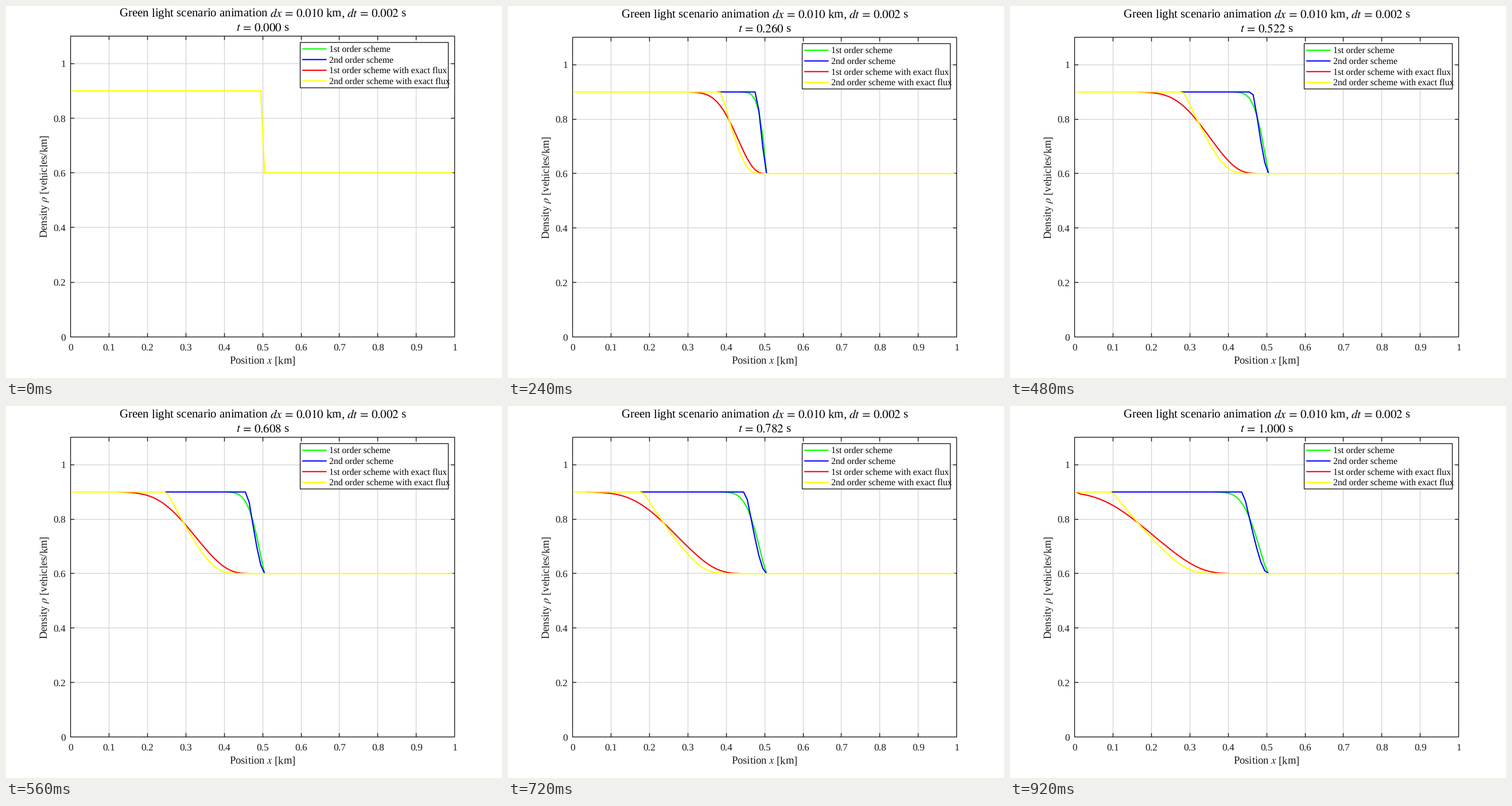
Animation of 864 by 648 pixels, one loop 960 ms. Source, as a matplotlib script:

```python
import math

import numpy as np
import matplotlib.pyplot as plt
from matplotlib.animation import FuncAnimation
from matplotlib.patches import Rectangle

W, H, DPI = 864, 648, 100
FRAMES, INTERVAL = 24, 40
DX, DT, STEPS = 0.01, 0.002, 500
LEFT, RIGHT, BOTTOM, TOP = 112.4, 781.8, 576.5, 52.5
Y_MAX = 1.1
INK, GRID = "#1a1a1a", "#d4d4d4"

plt.rcParams.update({
    "font.family": "Liberation Serif",
    "mathtext.fontset": "stix",
    "text.hinting": "none",
})


def px(n):
    """Pixels to points."""
    return n * 72 / DPI


# --- traffic model: all waves travel to the left ---
def log_flux(rho):
    return -rho * np.log10(rho)


def slow_flux(rho):
    excess = rho - 0.6
    return -(0.016 * excess + 0.0625 * excess ** 2)


def limited(ahead, behind):
    """Upwind slope, capped at twice the slope ahead of the wave."""
    size = np.minimum(2 * abs(ahead), abs(behind))
    return np.where(ahead * behind > 0, np.sign(behind) * size, 0)


def rate(rho, flux, order):
    face = rho.copy()
    if order == 2:
        d = np.diff(rho)
        face[1:-1] -= 0.5 * limited(d[:-1], d[1:])
    f = flux(face)
    out = np.zeros_like(rho)
    out[1:-1] = (f[1:-1] - f[2:]) / DX
    return out


def solve(flux, order):
    rho = np.where(x < 0.5, 0.9, 0.6)
    history = [rho]
    for _ in range(STEPS):
        k = rate(rho, flux, order)
        if order == 2:
            k = 0.5 * (k + rate(rho + DT * k, flux, order))
        rho = rho + DT * k
        history.append(rho)
    return history


x = (np.arange(100) + 0.5) * DX
SERIES = [
    ("1st order scheme", "#00ff00", solve(slow_flux, 1)),
    ("2nd order scheme", "#0000ff", solve(slow_flux, 2)),
    ("1st order scheme with exact flux", "#ff0000", solve(log_flux, 1)),
    ("2nd order scheme with exact flux", "#ffff00", solve(log_flux, 2)),
]

# --- drawing, in pixels from the top left ---
fig = plt.figure(figsize=(W / DPI, H / DPI), dpi=DPI, facecolor="white")
ax = fig.add_axes([0, 0, 1, 1])


def mid(v):
    """Centre of the pixel that holds v."""
    return math.floor(v) + 0.5


def line(xs, ys, color=INK, width=1.4, z=2):
    ax.plot(xs, ys, color=color, lw=px(width), zorder=z,
            solid_capstyle="butt", snap=False)


def rule(x0, y0, x1, y1, color=INK, width=1.4, z=2):
    """Crisp horizontal or vertical line."""
    if x0 == x1:
        x0 = x1 = mid(x0)
    else:
        y0 = y1 = mid(y0)
    line([x0, x1], [y0, y1], color, width, z)


def label(lx, ly, text, size, ha="center", color=INK, **kw):
    ax.text(lx, ly, text, fontsize=px(size), ha=ha, color=color,
            va=kw.pop("va", "baseline"), zorder=8, **kw)


def box(x0, y0, x1, y1, z, fill="none"):
    x0, y0, x1, y1 = map(mid, (x0, y0, x1, y1))
    ax.add_patch(Rectangle((x0, y0), x1 - x0, y1 - y0, fc=fill, ec=INK,
                           lw=px(1.4), zorder=z, joinstyle="miter",
                           snap=False))


def to_x(v):
    return LEFT + (RIGHT - LEFT) * v


def draw_axes(top):
    def to_y(v):
        return BOTTOM - (BOTTOM - top) * v / Y_MAX

    tick = 6.7
    for k in range(11):
        gx = to_x(k / 10)
        if 0 < k < 10:
            rule(gx, top, gx, BOTTOM, GRID, 1.3, 1)
            rule(gx, BOTTOM, gx, BOTTOM - tick)
            rule(gx, top, gx, top + tick)
        label(gx, 599.6, f"{k / 10:g}", 17.4)
    for k in range(6):
        gy = to_y(k / 5)
        if k:
            rule(LEFT, gy, RIGHT, gy, GRID, 1.3, 1)
            rule(LEFT, gy, LEFT + tick, gy)
            rule(RIGHT, gy, RIGHT - tick, gy)
        label(104, gy + 5.9, f"{k / 5:g}", 17.4, ha="right")
    box(LEFT, top, RIGHT, BOTTOM, 3)
    label(446.7, 623, "Position $x$ [km]", 18.6)
    label(67.9, (top + BOTTOM) / 2, r"Density $\rho$ [vehicles/km]", 18.65,
          rotation=90, va="center")
    return to_y


def draw_curves(step, to_y):
    curves = [history[step] for _, _, history in SERIES]
    for k, rho in enumerate(curves):
        shown = rho.copy()
        # leave out stretches covered by a later curve
        for other in curves[k + 1:]:
            same = np.pad(abs(rho - other) < 5e-4, 1, mode="edge")
            shown[same[:-2] & same[1:-1] & same[2:]] = np.nan
        line(to_x(x), to_y(shown), SERIES[k][1], 2.1, 4 + k / 10)


def draw_legend(shift):
    box(512, 63.5 + shift, 770.5, 142 + shift, 6, "white")
    for k, (name, color, _) in enumerate(SERIES):
        y = 74.7 + 18.6 * k + shift
        line([516, 558.5], [y, y], color, 2.1, 7)
        label(563.3, y + 5.2, name, 15.8, ha="left", color="black")


def draw(i):
    ax.clear()
    ax.set(xlim=(0, W), ylim=(H, 0))
    ax.axis("off")
    # the layout settles lower after the opening frame
    shift = 2.4 if i else 0
    step = round(i * STEPS / (FRAMES - 1))
    to_y = draw_axes(TOP + shift)
    draw_curves(step, to_y)
    draw_legend(shift)
    label(447, 19.2 + shift,
          r"Green light scenario animation $dx\,=\,0.010$ km, "
          r"$dt\,=\,0.002$ s", 20.9, color="black")
    label(447, 43.8 + shift, rf"$t\,=\,{step * DT:.3f}$ s", 20.9,
          color="black")
    return []


anim = FuncAnimation(fig, draw, frames=FRAMES, interval=INTERVAL,
                     init_func=lambda: [], repeat=True, repeat_delay=0)
plt.show()
```
